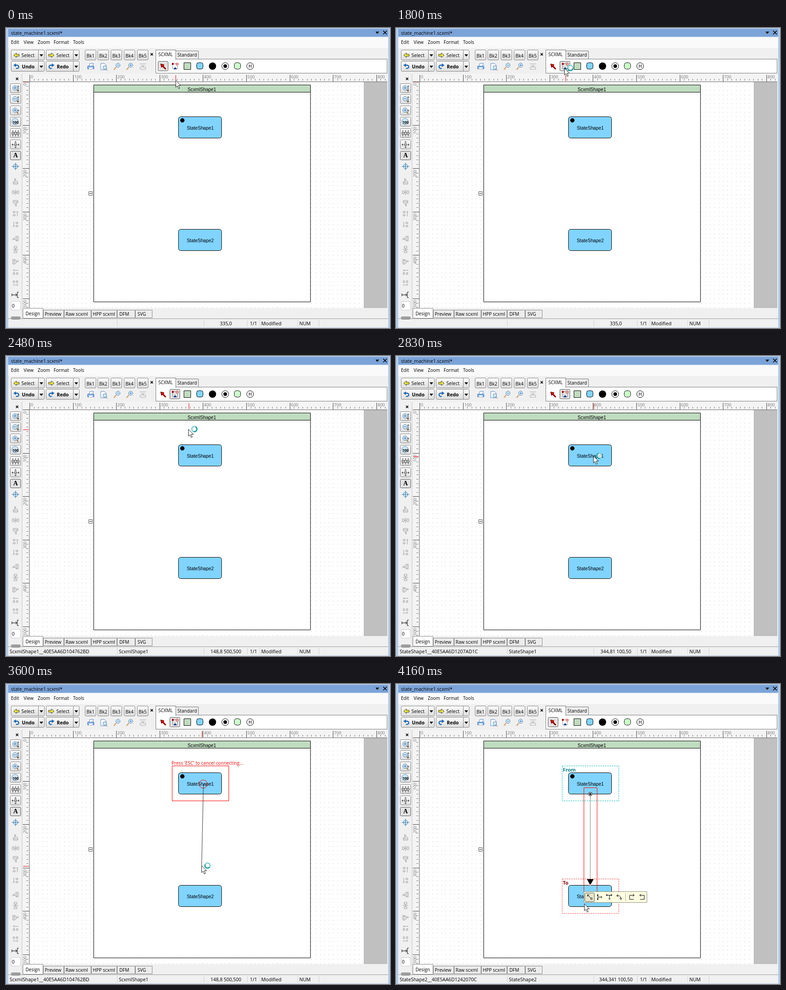
These frames come from a looping animation (847x661 px, 5750 ms). An HTML page with a canvas:

```html
<!DOCTYPE html>
<html lang="en">
<head>
<meta charset="utf-8">
<title>State machine editor</title>
<style>
html, body { margin: 0; width: 100%; height: 100%; overflow: hidden; }
canvas { display: block; }
</style>
</head>
<body>
<canvas id="stage" width="847" height="661"></canvas>
<script>
const stage = document.getElementById('stage');
const back = document.createElement('canvas');
back.width = 847;
back.height = 661;
let g = back.getContext('2d');

const LOOP = 5750, STEP = 70, UNIT = 9.56;
const UI = '"Open Sans", "Noto Sans", sans-serif';
const ARIAL = '"Liberation Sans", Arial, sans-serif';

// ---- helpers ----
function text(s, x, y, { size = 10.5, color = '#000', align = 'left', weight = 400, font = UI } = {}) {
  g.font = `${weight} ${size}px ${font}`;
  g.fillStyle = color;
  g.textAlign = align;
  g.fillText(s, x, y + 4);
}
function fill(x, y, w, h, color) {
  g.fillStyle = color;
  g.fillRect(x, y, w, h);
}
function box(x, y, w, h, paint, edge, r = 0) {
  g.beginPath();
  g.roundRect(x + .5, y + .5, w, h, r);
  if (paint) { g.fillStyle = paint; g.fill(); }
  if (edge) { g.strokeStyle = edge; g.lineWidth = 1; g.stroke(); }
}
function disc(x, y, r, paint, edge) {
  g.beginPath();
  g.arc(x, y, r, 0, 7);
  if (paint) { g.fillStyle = paint; g.fill(); }
  if (edge) { g.strokeStyle = edge; g.lineWidth = 1; g.stroke(); }
}
function line(x1, y1, x2, y2, color, dash = []) {
  g.setLineDash(dash);
  g.strokeStyle = color;
  g.lineWidth = 1;
  g.beginPath();
  g.moveTo(x1, y1);
  g.lineTo(x2, y2);
  g.stroke();
  g.setLineDash([]);
}
function icon(x, y, d, edge, paint, width = 1) {
  const p = new Path2D(d);
  g.save();
  g.translate(x, y);
  g.lineWidth = width;
  if (paint) { g.fillStyle = paint; g.fill(p); }
  if (edge) { g.strokeStyle = edge; g.stroke(p); }
  g.restore();
}
function button(x, y, w, h) {
  const shade = g.createLinearGradient(0, y, 0, y + h);
  shade.addColorStop(0, '#fcfcfc');
  shade.addColorStop(1, '#dedede');
  box(x, y, w, h, shade, '#858585', 2);
}
function pressed(x, y, w, h) {
  box(x, y, w, h, '#e2e2e2', '#555', 2);
}
function lens(x, y, r = 4) {
  disc(x, y, r, '#d4ecfa', '#4e7fa8');
}
const DOWN = 'M-4-2H4L0 3Z';
const CROSS = 'M-2.5-2.5L2.5 2.5M2.5-2.5L-2.5 2.5';

// ---- static window ----
function drawTopBars() {
  fill(0, 0, 847, 661, '#b4cce8');
  fill(5, 20, 838, 640, '#f0f0f0');
  fill(5, 2, 838, 17, '#7ba3d8');
  text('state_machine1.scxml*', 11, 11);
  icon(819, 10, DOWN, null, '#000');
  icon(836, 10, 'M-4-4L4 4M4-4L-4 4', '#000', null, 1.6);

  fill(5, 20, 838, 24, '#fafafa');
  [['Edit', 11], ['View', 39], ['Zoom', 70], ['Format', 105], ['Tools', 148]]
    .forEach(([s, x]) => text(s, x, 31, { size: 10 }));

  const back1 = 'M-6 0L0-5V-2H6V2H0V5Z', fwd = 'M6 0L0-5V-2H-6V2H0V5Z';
  [[11, 'Select', 'Undo', back1], [88, 'Select', 'Redo', fwd]].forEach(([x, a, b, d], i) => {
    [48, 73].forEach(y => {
      button(x, y, 73, 22);
      line(x + 60.5, y + 1, x + 60.5, y + 22, '#858585');
      icon(x + 67, y + 12, DOWN, null, '#000');
    });
    icon(x + 12, 60, d, '#333', '#f4ee35');
    text(a, x + 23, 60);
    g.save();
    g.translate(x + 12, 85);
    if (i) g.scale(-1, 1);
    icon(0, 0, 'M-2-3H2C7-2 6 5-1 4', '#2369ad', null, 2.4);
    icon(0, 0, 'M-7-3L-1-7V1Z', null, '#2369ad');
    g.restore();
    text(b, x + 24, 85, { weight: 700 });
  });

  for (let i = 0; i < 5; i++) {
    const x = 174 + i * 28.75 | 0;
    button(x, 48, 24, 22);
    text('Bk' + (i + 1), x + 12.5, 61, { size: 10.2, align: 'center' });
  }

  // printer, preview, zoom and fit icons
  icon(187, 85, 'M-4-1L-2-7H6L4-1', '#4b86c5', '#fff');
  icon(187, 85, 'M-7-1H7V5H-7Z', '#3d71b8', '#86b5e8');
  fill(183, 87, 8, 3, '#fff');
  icon(215, 85, 'M-6-7H2L6-3V7H-6Z', '#4b86c5', '#fff');
  lens(218, 87);
  line(221, 90, 224, 94, '#8a7651');
  [[245, 'M-2 0H2'], [273, 'M-2 0H2M0-2V2']].forEach(([x, d]) => {
    icon(x, 85, 'M-7 7L-2 1', '#d4a56a', null, 2.4);
    lens(x + 2, 82, 4.5);
    icon(x + 2, 82, d, '#2c62a0');
  });
  icon(302, 85, 'M-7-6H7M-6 1H6V6H-6ZM0-4V-1M-4-3L0 0L4-3', '#aaa');

  icon(321.5, 58, CROSS, '#000', null, 1.7);
  box(374, 50, 50, 18, '#ededed', '#777');
  box(330, 68, 510, 31, '#fff', '#777');
  box(330, 48, 44, 21, '#fff', '#777');
  fill(331, 67, 43, 4, '#fff');
  text('SCXML', 336, 58, { size: 10 });
  text('Standard', 378, 59, { size: 10.2 });

  box(392, 76, 15, 15, '#c0dcc0', '#000');
  box(420, 76, 14, 14, '#80d4ff', '#000', 4);
  disc(455.5, 84, 8, '#000');
  disc(483.5, 84, 7.5, '#fff', '#000');
  disc(483.5, 84, 4, '#000');
  box(503, 76, 14, 14, '#ccffcc', '#000', 5);
  disc(538.5, 84, 7.5, '#fff', '#000');
  text('H', 538.5, 84, { size: 10, align: 'center', font: ARIAL });
}

function drawSideBar() {
  icon(24.5, 112, CROSS, '#000', null, 1.7);
  for (let i = 0; i < 6; i++) button(9, 122 + i * 24.8 | 0, 23, 20);
  [133, 157, 182].forEach((y, i) => {
    lens(20, y - 1, 5);
    icon(20, y - 1, i === 1 ? 'M-3 0H3' : 'M-3 0H3M0-3V3', '#285f96');
    icon(20, y, 'M4 3L7 7', '#80602c', null, 2);
    icon(27, y, i === 2 ? 'M-2 0H2M0-2V2' : 'M0-6V6M-2-4L0-6L2-4M-2 4L0 6L2 4', '#345');
  });
  lens(20, 206, 7);
  text('100', 21, 207, { size: 8, align: 'center', weight: 700 });
  icon(21, 232, 'M-8-2H8V2H-8ZM-3-2V2M3-2V2M-6-7V-3M0-7V-3M6-7V-3M-6 7V3M0 7V3M6 7V3', '#222');
  icon(21, 257, 'M-2-2H2V2H-2ZM-8 0H-4M8 0H4M0-7V-4M0 7V4M-6-2L-8 0L-6 2M6-2L8 0L6 2M-2-5L0-7L2-5M-2 5L0 7L2 5', '#222');
  pressed(9, 271, 23, 19);
  text('A', 21, 281, { size: 14, weight: 700, align: 'center', font: '"Liberation Serif", serif' });
  lens(21, 305, 5);
  icon(21, 305, 'M-8 0H8M0-8V8', '#2f6f9f');

  const hand = 'M-5 6H5V1L3-1H0V-6H-2V1H-5ZM-5 3H5';
  const align = 'M-7-3H-3V3H-7ZM3-3H7V3H3ZM0-6V6M-3 0H3';
  const move = 'M-5-5H-1V-2H-5ZM-5 2H-1V5H-5ZM4 6V-5M2-3L4-5L6-3';
  [[338, hand, 0], [362, align, 0], [386, hand, 2], [409, move, 0], [433, move, 2], [464, hand, 3],
   [488, align, 1], [515, hand, 1], [538, move, 3], [562, move, 1]].forEach(([y, d, turn]) => {
    g.save();
    g.translate(21, y);
    g.rotate(turn * Math.PI / 2);
    icon(0, 0, d, '#9a9a9a');
    g.restore();
  });
  icon(21, 588, 'M-8 0H3M0-3L3 0L0 3M-8-3V3M7-6H4V6H7', '#000');
  box(11, 602, 20, 19, '#fff', '#d0d0d0');
  text('0', 13, 612);
  box(11, 636, 20, 5, '#aaa', '#666', 2);
  line(35.5, 101, 35.5, 640, '#c4c4c4');
}

function drawCanvasArea() {
  fill(36, 101, 805, 17, '#f4f4f4');
  fill(36, 118, 16, 499, '#f4f4f4');
  fill(52, 119, 737, 498, '#fff');
  fill(789, 119, 52, 498, '#c0c0c0');

  for (let x = 1; x < 77; x++)
    for (let y = 1; y < 53; y++)
      if (118 + y * UNIT < 616) fill(Math.round(52 + x * UNIT), Math.round(118 + y * UNIT), 1, 1, '#a8a8a8');

  for (let i = 0; i < 83; i++) {
    const x = Math.round(52 + i * UNIT) + .5, major = i % 10 === 0;
    line(x, major ? 103 : 112, x, major ? 118 : 116, major ? '#444' : '#777');
    if (major) text(i * 10, x + 2, 107, { size: 9.5, color: '#777' });
  }
  for (let i = 0; i < 53; i++) {
    const y = Math.round(118 + i * UNIT) + .5, major = i % 10 === 0;
    if (y > 616) break;
    line(major ? 37 : 45, y, major ? 51 : 49, y, major ? '#444' : '#777');
    if (major) {
      g.save();
      g.translate(41, y + 3);
      g.rotate(-Math.PI / 2);
      text(i * 10, 0, 0, { size: 9.5, color: '#777', align: 'right' });
      g.restore();
    }
  }
  line(51, 118.5, 841, 118.5, '#666');
  line(51.5, 118, 51.5, 617, '#666');

  box(193, 125, 478, 478, '#fff', '#000');
  box(193, 125, 478, 16, '#c0dcc0', '#000');
  text('ScxmlShape1', 432, 135, { size: 10.2, align: 'center', font: ARIAL });
  box(182, 360, 8, 8, '#fff', '#555');
  line(184, 364.5, 189, 364.5, '#000');
  [195, 443].forEach((y, i) => {
    box(380, y, 95, 47, '#80d4ff', '#000', 5);
    text('StateShape' + (i + 1), 428.5, y + 25, { size: 10.3, align: 'center', font: ARIAL });
  });
  disc(389, 203.5, 4.7, '#000');
}

function drawBottomBars() {
  fill(36, 617, 805, 24, '#f0f0f0');
  [['Preview', 82, 45], ['Raw scxml', 128, 59], ['HPP scxml', 188, 56], ['DFM', 245, 39], ['SVG', 285, 37]]
    .forEach(([s, x, w]) => {
      box(x, 621, w, 17, '#ececec', '#888');
      text(s, x + (w < 40 ? 5 : 3.5), 630, { size: 10.1 });
    });
  box(37, 617, 44, 22, '#fff', '#888');
  text('Design', 43, 629, { size: 10 });
  line(5, 640.5, 843, 640.5, '#999');
  [245, 436, 532, 560, 643, 690].forEach(x => line(x + .5, 643, x + .5, 658, '#d2d2d2'));
  text('1/1', 538, 651);
  text('Modified', 563, 651, { size: 10.8 });
  text('NUM', 647, 651);
}

drawTopBars();
drawSideBar();
drawCanvasArea();
drawBottomBars();
g = stage.getContext('2d');

// ---- moving parts ----
const path = [[0, 374, 115], [390, 374, 115], [740, 371, 88], [2060, 371, 88], [2200, 371, 98],
  [2340, 385, 132], [2760, 435, 220], [3040, 435, 220], [3250, 435, 263], [3600, 431, 400],
  [3880, 423, 466], [3950, 423, 466], [4160, 415, 484]];

function pointerAt(t) {
  const n = path.findIndex(k => k[0] > t);
  if (n < 0) return path.at(-1).slice(1);
  const [t0, x0, y0] = path[n - 1], [t1, x1, y1] = path[n], k = (t - t0) / (t1 - t0);
  return [Math.round(x0 + (x1 - x0) * k), Math.round(y0 + (y1 - y0) * k)];
}

function drawTools(t, connecting) {
  if (connecting) pressed(361, 73, 22, 21);
  else {
    pressed(335, 73, 22, 21);
    if (t >= 740 && t < 1800) box(361, 73, 22, 21, '#f4f4f4', '#b0b0b0', 2);
  }
  icon(347, 84, 'M-6-5L2-3L0-1L6 6L4 7L-2 1L-4 3Z', '#600', '#d00000');
  g.setLineDash([2, 2]);
  box(367, 78, 11, 11, null, '#333');
  g.setLineDash([]);
  fill(366, 77, 4, 4, '#a00');
  box(375, 77, 4, 4, '#fff', '#a00');
  icon(373, 89, 'M-4 2L0-3L4 2Z', null, '#123a8c');
}

function drawStatus(t, y) {
  let id = '', name = '', pos = '335,0';
  if (t >= 1930) name = "Connecting two shapes. Press 'ESC' to cancel";
  if (t > 2200 && y > 125) [id, name, pos] = ['ScxmlShape1__40E5AA6D104762BD', 'ScxmlShape1', '148,8 500,500'];
  if (y >= 195 && y <= 242) [id, name, pos] = ['StateShape1__40E5AA6D1207AD1C', 'StateShape1', '344,81 100,50'];
  if (y >= 443) [id, name, pos] = ['StateShape2__40E5AA6D1242070C', 'StateShape2', '344,341 100,50'];
  text(id, 8, 651);
  g.save();
  g.beginPath();
  g.rect(246, 642, 190, 17);
  g.clip();
  text(name, 249, 651);
  g.restore();
  text(pos, 485, 651, { align: 'center' });
}

function drawLink(x, y) {
  text("Press 'ESC' to cancel connecting...", 365, 174, { size: 10.2, color: '#f00' });
  box(366, 180, 125, 77, null, '#f00');
  disc(435, 220.5, 9, null, '#f00');
  line(435.5, 221, x + .5, y, y >= 443 || y < 243 ? '#f00' : '#333');
}

function drawResult() {
  g.setLineDash([3, 2]);
  box(366, 180, 125, 77, null, '#00b4b4');
  box(366, 429, 125, 76, null, '#ff4040');
  g.setLineDash([]);
  text('From', 368, 189, { size: 11, weight: 700, color: '#008080' });
  text('To', 368, 438, { size: 11, weight: 700, color: '#800000' });
  box(414, 228, 29, 240, null, '#f00');
  line(428.5, 247, 428.5, 430, '#000', [1, 1]);
  disc(428.5, 242.5, 4, '#fff', '#000');
  disc(428.5, 242.5, 2.3, '#000');
  icon(428.5, 430, 'M-7.5 0H7.5L0 13Z', null, '#000');
  disc(428.5, 443, 1.5, '#fff', '#f66');

  box(414, 457, 139, 24, '#ffffe1', '#8c8c7c');
  box(416, 460, 21, 19, '#e6e6cc', '#555', 2);
  const links = ['M-5-5L3 3M-5-1V-5H-1', 'M-4-4V4M-4 0H5M3-2L5 0L3 2', 'M-5-4H5M0-4V5M-2 3L0 5L2 3', 'M-5-3C0-5 3-1 3 3M-3-6L-6-3L-2-1'];
  links.forEach((d, i) => icon(427.5 + i * 21.7, 469.5, d, '#000'));
  [[431, 473], [496, 473]].forEach(([x, y]) => disc(x, y, 1.8, '#fff', '#000'));
  [[445, 465], [445, 474], [465, 465], [475, 465]].forEach(([x, y]) => disc(x, y, 1.6, '#000'));
  line(506.5, 461, 506.5, 479, '#aaa');
  icon(520.5, 469.5, 'M5-4H-5V5H4M2-7L5-4L2-1', '#000');
  icon(542.5, 469.5, 'M-5-4H5V5H-4M-2-7L-5-4L-2-1', '#000');
}

function drawPointer(x, y, busy, t) {
  icon(x + .5, y + .5, 'M0 0V15L3.5 12L6 18L8.5 17L6 11H11Z', '#222', '#fff');
  if (!busy) return;
  disc(x + 13.5, y, 5, 'rgba(255,255,255,.75)');
  g.lineWidth = 2.6;
  g.strokeStyle = '#80cfd0';
  g.beginPath();
  g.arc(x + 13.5, y, 5.7, 0, 7);
  g.stroke();
  g.strokeStyle = '#229fa4';
  g.beginPath();
  g.arc(x + 13.5, y, 5.7, t / 140, t / 140 + 3);
  g.stroke();
}

function draw(t) {
  const step = t < 460 ? 0 : Math.floor((t - 30) / STEP) * STEP + 30;
  const [x, y] = pointerAt(step);
  const connecting = t >= 1800 && t < 4160;
  g.drawImage(back, 0, 0);
  drawTools(t, connecting);

  if (t < 4160) {
    const inside = y > 118;
    const mx = inside ? x + 1.5 : 374.5, my = inside ? y + 1.5 : 119.5;
    line(mx, 104, mx, 117, '#f00');
    line(38, my, 50, my, inside ? '#f00' : '#f08080');
  }
  if (t >= 3040 && t < 4160) drawLink(x, y);
  if (t >= 4160) drawResult();
  drawStatus(t, y);
  if (t >= 870 && t < 1800) {
    box(370, 112, 185, 18, '#fff', '#666');
    text('Connect shapes (Ctrl+Mouse Right)', 373, 122, { size: 11 });
  }
  drawPointer(x, y, connecting, step);
}

const start = performance.now();
function tick() {
  draw((performance.now() - start) % LOOP);
  requestAnimationFrame(tick);
}
tick();
</script>
</body>
</html>
```
